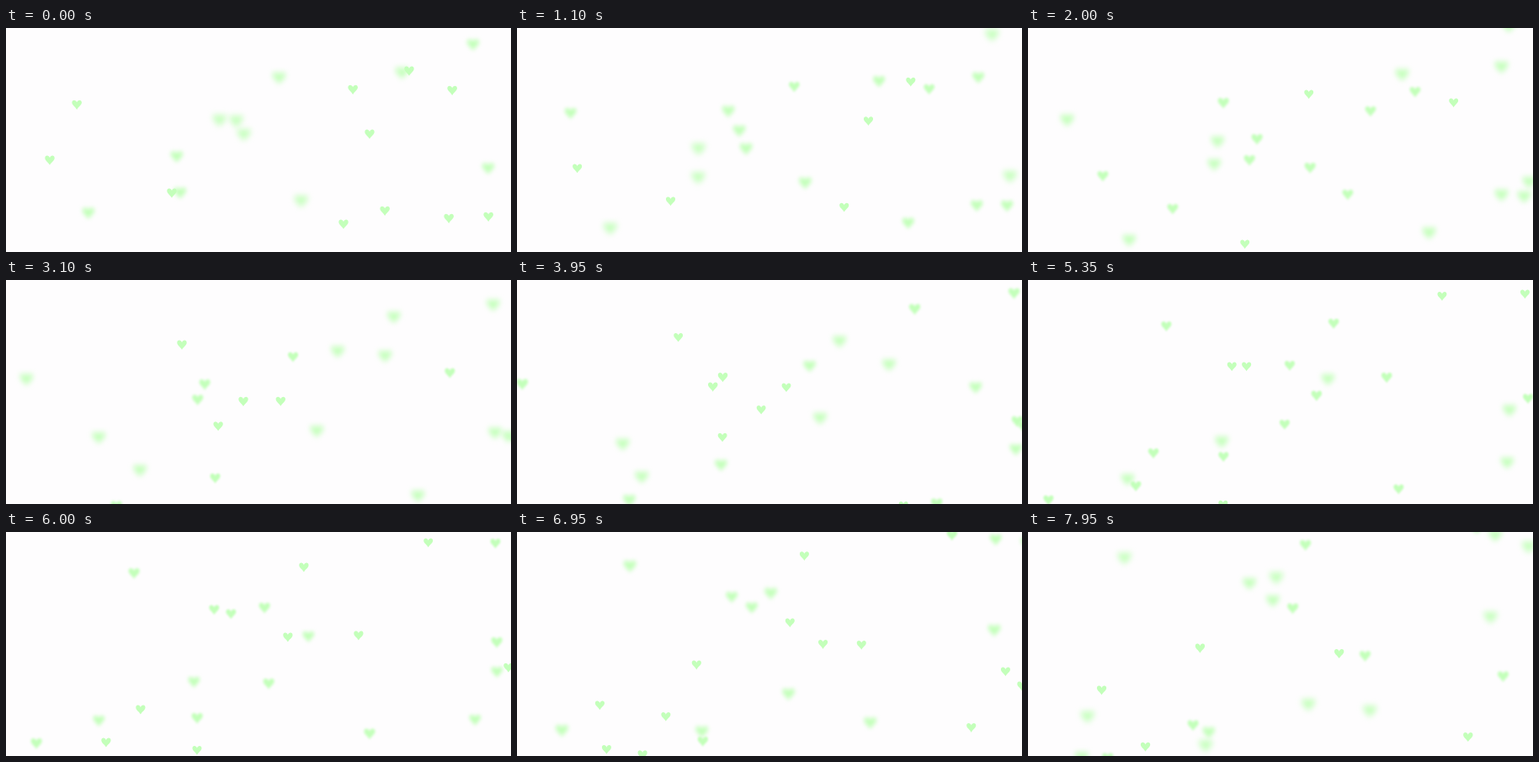
Animation, 600 px wide and 266 px high, one loop 8000 ms. Source, as an HTML page:

```html
<!DOCTYPE html>
<html lang="en">
<head>
<meta charset="utf-8">
<title>Drifting hearts</title>
<style>
html, body { margin: 0; width: 100%; height: 100%; overflow: hidden; background: #fefdfe; }
svg { display: block; width: 100%; height: 100%; }
path { fill: #c3ffba; }
</style>
</head>
<body>
<svg id="stage" viewBox="0 0 600 266"></svg>
<script>
const W = 600, H = 266, LOOP = 8, STEP = 0.05, MARGIN = 10;
const SHAPE = 'M0 5.6C-1.8 2.2-5.6.4-5.6-2.5C-5.6-6.2-1-6.2 0-2.7C1-6.2 5.6-6.2 5.6-2.5C5.6.4 1.8 2.2 0 5.6Z';
const stage = document.getElementById('stage');
const hearts = [];

// A heart passes (x, y) at time t0 and drifts at (vx, vy) px/s.
// Higher waves lose focus later and pulse faster.
function addHeart(wave, t0, x, y, vx, vy) {
  const el = document.createElementNS('http://www.w3.org/2000/svg', 'path');
  el.setAttribute('d', SHAPE);
  stage.append(el);
  hearts.push({ el, t0, x, y, vx, vy, period: 8 - 0.7 * wave, peak: 1.2 * wave });
}

// Main hearts, one list per wave: place at mid-loop and velocity.
[
  [[292, 156, 10, 12], [192, 69, -20, -10], [245, 189, -9, 16], [321, 128, -7, -19],
   [619, 163, -18, -16], [2, 285, 17, -17]],
  [[234, 127, 7, -17], [246, 116, 11, -9], [141, 283, 11, 16], [586, -25, 8, -11],
   [616, 198, 11, 8]],
  [[473, 34, 15, -10], [591, 15, 15, -15], [5, 124, -20, 8], [499, 266, 12, 12],
   [595, 167, 17, -15], [602, 173, 7, -13]],
  [[440, 100, -10, 12], [146, 233, -13, 9], [358, 162, -11, -18], [381, 71, -13, -14],
   [125, 194, 18, 9]],
  [[545, 128, 19, 19], [347, 102, 6, 11], [241, 218, -9, -20], [132, 260, -11, -18],
   [591, 201, -17, 11]]
].forEach((list, wave) => list.forEach(p => addHeart(wave, LOOP / 2, ...p)));

let seed = 5;
function random(lo, hi) {
  seed = seed * 16807 % 2147483647;
  return lo + (hi - lo) * seed / 2147483647;
}

// Latecomers drift in over the right and bottom edges.
for (let i = 0; i < 7; i++) {
  const t0 = 3.5 + i * 0.6, side = random(-14, 14), speed = random(8, 18);
  if (i % 2) addHeart(i % 5, t0, W + MARGIN, random(0, H), -speed, side);
  else addHeart(i % 5, t0, random(0, W), H + MARGIN, side, -speed);
}

function draw(t) {
  for (const h of hearts) {
    const soft = 0.5 + 0.5 * Math.cos(2 * Math.PI * (t - h.peak) / h.period);
    const shift = 3 * (soft - 0.45); // blurred hearts grow down and right
    const x = h.x + h.vx * (t - h.t0) + shift;
    const y = h.y + h.vy * (t - h.t0) + shift;
    const size = 0.97 + 0.4 * soft;
    h.el.setAttribute('transform', `translate(${x.toFixed(2)} ${y.toFixed(2)}) scale(${size.toFixed(3)})`);
    h.el.style.filter = `blur(${(0.35 + 2.2 * soft).toFixed(2)}px)`;
  }
}

const start = performance.now();
function tick() {
  const t = (performance.now() - start) / 1000 % LOOP;
  draw(Math.floor(t / STEP) * STEP);
  requestAnimationFrame(tick);
}
tick();
</script>
</body>
</html>
```
